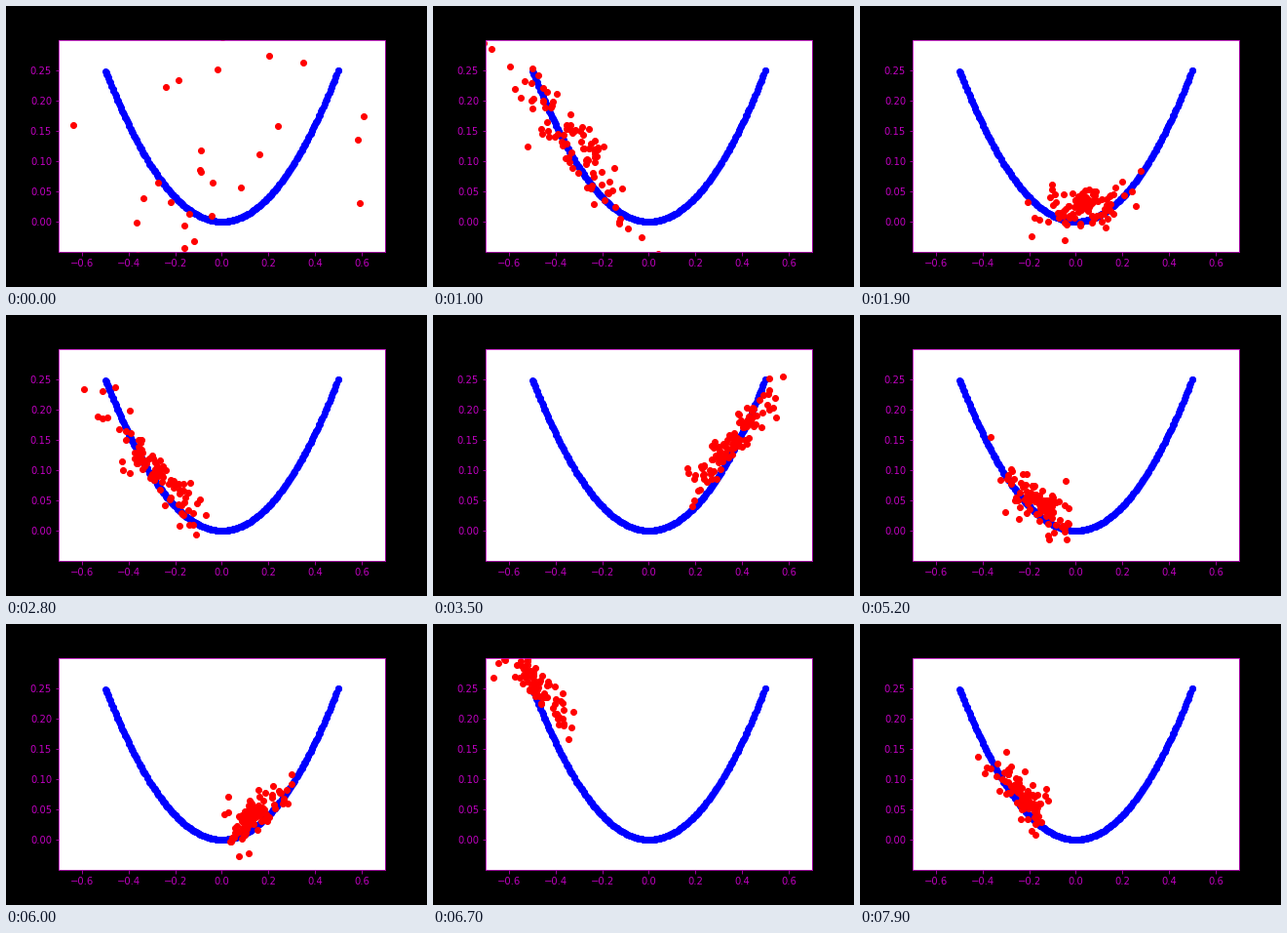
Write a matplotlib script that moves like this. It is 432 by 288 pixels and loops after 8000 ms.

```python
import numpy as np
import matplotlib.pyplot as plt
from matplotlib.animation import FuncAnimation

FRAMES, STEP, COUNT = 80, 100, 100
INK = "m"

# turning points of the cloud's swing: seconds, centre x
TURNS = [(0, -0.1), (1, -0.34), (1.7, 0.2), (2.3, -0.4), (2.8, -0.28),
         (3.6, 0.38), (4.2, 0.18), (4.9, -0.4), (5.2, -0.16), (5.7, 0.32),
         (6.7, -0.49), (7.1, 0.2), (7.9, -0.22)]


def swing(t):
    """Centre x, eased between turning points."""
    times, xs = zip(*TURNS)
    pos = np.interp(t, times, range(len(xs)))
    i = min(int(pos), len(xs) - 2)
    k = pos - i
    return xs[i] + (xs[i + 1] - xs[i]) * k * k * (3 - 2 * k)


def cloud(i):
    """Fresh samples that chase the parabola and tighten with training."""
    t = i * STEP / 1000
    rng = np.random.default_rng(500 + i)
    cx = swing(t)
    side = np.tanh(5 * cx)
    chaos = np.exp(-3 * t)
    spread = 0.04 + 0.8 * chaos + 0.11 * np.exp(-t / 3) + 0.08 * abs(cx)
    noise = 0.018 + 0.3 * chaos

    u, v = rng.standard_normal((2, COUNT))
    dx = spread * (u + 0.1 * side * (u * u - 1))
    dy = 0.45 * side * dx + noise * (0.7 + 0.4 * abs(u)) * v
    return np.column_stack([cx + dx, cx * cx + 0.02 + dy])


fig = plt.figure(figsize=(6, 4), dpi=72, facecolor="black")
ax = fig.add_axes([0.125, 0.125, 0.775, 0.755], facecolor="white")
ax.set(xlim=(-0.7, 0.7), ylim=(-0.05, 0.3))
ax.set_xticks(np.arange(-3, 4) * 0.2)
ax.set_yticks(np.arange(6) * 0.05)
ax.tick_params(colors=INK, labelsize=10)
for spine in ax.spines.values():
    spine.set_color(INK)

rng = np.random.default_rng(4)
x = np.linspace(-0.5, 0.5, 330) + rng.uniform(-0.003, 0.003, 330)
x = x.clip(-0.5, 0.5)
ax.scatter(x, x * x, s=36, color="blue")
dots = ax.scatter([], [], s=36, color="red")


def update(i):
    dots.set_offsets(cloud(i))
    return (dots,)


anim = FuncAnimation(fig, update, frames=FRAMES, interval=STEP,
                     repeat=True, repeat_delay=0)
plt.show()
```
